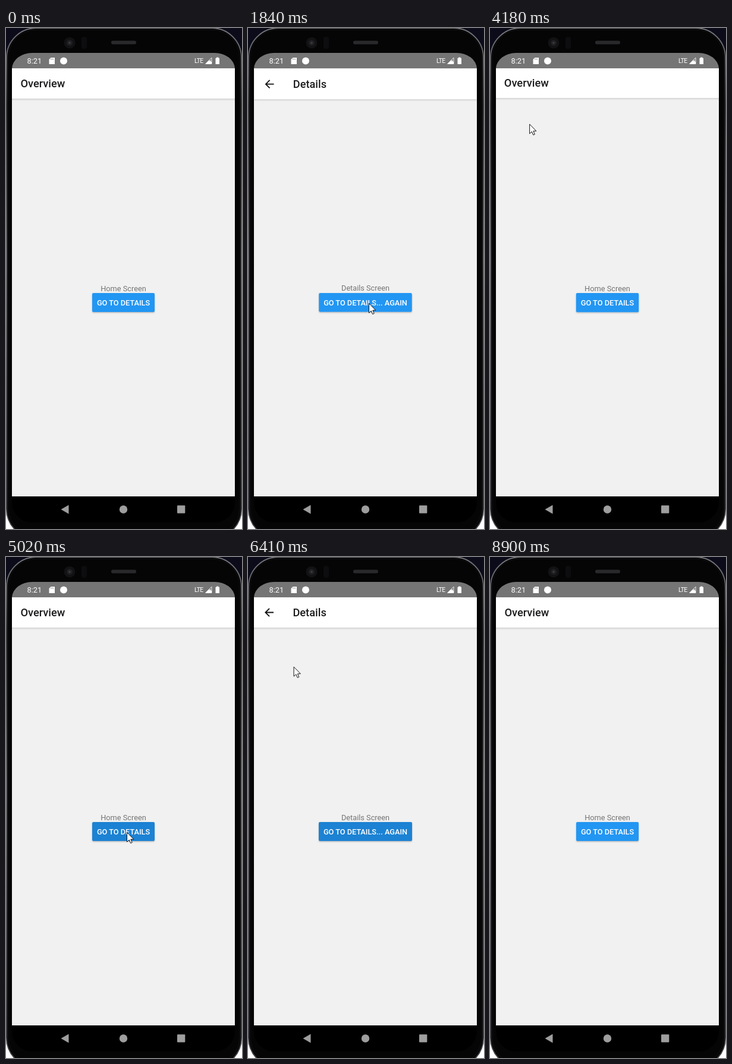
Recreate the animation shown at these times as an HTML page. Size 397 by 845 pixels, loop 9170 ms.

```html
<!DOCTYPE html>
<html lang="en">
<head>
<meta charset="utf-8">
<title>Stack navigation</title>
<style>
  html, body { margin: 0; width: 100%; height: 100%; overflow: hidden; background: #000; }
  svg { display: block; width: 100%; height: 100%; }
  text { font-family: Roboto, sans-serif; font-size: 12.76px; }
  .title { font-size: 18.25px; font-weight: 500; fill: #1c1c1e; }
  .label { fill: #757575; text-anchor: middle; }
  .caption { fill: #fff; font-weight: 500; text-anchor: middle; }
  .network { font-size: 10.5px; letter-spacing: -.6px; }
</style>
</head>
<body>
<svg viewBox="0 0 397 845">
  <defs>
    <linearGradient id="rim" x1="0" y1="0" x2="0" y2="1">
      <stop offset="0" stop-color="#77787b"/>
      <stop offset=".15" stop-color="#38393b"/>
      <stop offset=".45" stop-color="#66676a"/>
      <stop offset="1" stop-color="#3c3d40"/>
    </linearGradient>
    <linearGradient id="shade" x1="0" y1="0" x2="0" y2="1">
      <stop offset="0" stop-opacity=".13"/>
      <stop offset="1" stop-opacity="0"/>
    </linearGradient>
    <filter id="lift" x="-10%" y="-20%" width="120%" height="160%">
      <feDropShadow dx="0" dy="1.2" stdDeviation="1.2" flood-opacity=".28"/>
    </filter>
    <clipPath id="window"><rect x="10" y="68" width="375" height="722"/></clipPath>
  </defs>

  <!-- Phone body -->
  <rect width="397" height="420" fill="#0b0b1a"/>
  <rect y="420" width="397" height="425" fill="#fff"/>
  <rect x="1" y="0" width="395" height="861" rx="50" fill="#050506" stroke="url(#rim)" stroke-width="2"/>
  <rect x="4" y="3" width="389" height="853" rx="46" fill="#050506" stroke="#121214"/>
  <circle cx="107" cy="25" r="9.5" fill="#121214"/>
  <circle cx="107" cy="25" r="5" fill="#1f1f22"/>
  <circle cx="107" cy="25" r="2" fill="#38383d"/>
  <rect x="127" y="15" width="9" height="20" rx="3" fill="#0d0d0f"/>
  <rect x="177" y="21.5" width="42" height="6" rx="3" fill="#29292b"/>
  <path d="M10 789H385V800A34 34 0 0 1 351 834H44A34 34 0 0 1 10 800Z" fill="#000"/>

  <!-- Status bar -->
  <path d="M10 68A34 27 0 0 1 44 42H351A34 27 0 0 1 385 68Z" fill="#757575"/>
  <g fill="#fff">
    <text x="35.5" y="60">8:21</text>
    <path d="M75.5 50H82V61H72.5V53Z"/>
    <path d="M75.5 51.5v2m2-2v2m2-2v2" stroke="#757575" stroke-width=".8"/>
    <circle cx="97" cy="55.5" r="6"/>
    <text class="network" x="317" y="59.3">LTE</text>
    <path d="M341 55V61H335ZM341 55V61H346V57Z"/>
    <path d="M335.5 60.5L346 50V60.5M342 54l3 3m0-3l-3 3" fill="none" stroke="#fff" stroke-width=".8"/>
    <path d="M354 49.5h3.5v1.2H359V61H352.5V50.7H354Z"/>
  </g>

  <!-- Navigation bar -->
  <g fill="#9e9e9e">
    <path d="M92.500 812L105.500 804.500V819.500Z"/>
    <circle cx="197.5" cy="812" r="6.7"/>
    <rect x="288" y="805.3" width="13.3" height="13.3" rx="1"/>
  </g>

  <g clip-path="url(#window)">
    <rect x="10" y="68" width="375" height="722" fill="#f1f1f1"/>
    <g id="home"></g>
    <g id="details"></g>
  </g>
  <path id="cursor" d="M.5 .5V16.5L4.2 13L6.7 18.7L9.2 17.6L6.8 12.1H11.8Z"
        fill="#fff" stroke="#111" stroke-linejoin="round"/>
</svg>
<script>
const LOOP = 9170, TRANSITION = 400, CENTER_X = 197.5, CENTER_Y = 429;
const BUTTON = [203, 464], BACK = [35, 93];

const TAPS = [
  { at: 1585, on: "home", opens: true },
  { at: 3350, on: "details" },
  { at: 3965, on: "back" },
  { at: 5040, on: "home", opens: true },
  { at: 6300, on: "details" },
  { at: 6860, on: "back" }
];

// Where the pointer rests, and from when until when
const RESTS = [
  { from: 120, to: 120, spot: [344, 838] },
  { from: 400, to: 600, spot: [247, 698] },
  { from: 960, to: 1160, spot: [197, 504] },
  { from: 1400, to: 2650, spot: BUTTON },
  { from: 2900, to: 3200, spot: [197, 476] },
  { from: 3700, to: 3950, spot: BACK },
  { from: 4790, to: 6080, spot: BUTTON },
  { from: 6570, to: 6870, spot: BACK },
  { from: 7450, to: 7520, spot: [250, 415] },
  { from: 8100, to: 8350, spot: [322, 800] },
  { from: 8890, to: 8890, spot: [358, 845] }
];

const byId = id => document.getElementById(id);
const clamp = v => Math.min(1, Math.max(0, v));
const lerp = (a, b, k) => a + (b - a) * k;
const smooth = k => k * k * (3 - 2 * k);

function screen({ title, titleX, label, caption, width, arrow = "" }) {
  return `
    <rect x="10" y="68" width="375" height="722" fill="#f1f1f1"/>
    <rect x="10" y="119" width="375" height="4" fill="url(#shade)"/>
    <rect x="10" y="68" width="375" height="51" fill="#fff"/>
    ${arrow}
    <text class="title" x="${titleX}" y="100">${title}</text>
    <text class="label" x="${CENTER_X}" y="443.5">${label}</text>
    <rect class="button" x="${CENTER_X - width / 2}" y="447" width="${width}" height="32" rx="2" filter="url(#lift)"/>
    <text class="caption" x="${CENTER_X}" y="468">${caption}</text>`;
}

byId("home").innerHTML = screen({
  title: "Overview", titleX: 24.4, label: "Home Screen", caption: "GO TO DETAILS", width: 105
});
byId("details").innerHTML = screen({
  title: "Details", titleX: 75.4, label: "Details Screen", caption: "GO TO DETAILS... AGAIN", width: 157,
  arrow: `<path d="M43 93.5H29.500M36 86.800L29.300 93.500L36 100.200" fill="none" stroke="#111" stroke-width="1.8"/>`
});

// Cubic bezier (0.208, 0.82, 0.25, 1), solved by bisection
function ease(x) {
  if (x <= 0 || x >= 1) return clamp(x);
  const curve = (s, a, b) => 3 * (1 - s) ** 2 * s * a + 3 * (1 - s) * s * s * b + s ** 3;
  let low = 0, high = 1;
  for (let i = 0; i < 20; i++) {
    const mid = (low + high) / 2;
    if (curve(mid, .208, .25) < x) low = mid; else high = mid;
  }
  return curve(low, .82, 1);
}

function place(id, scale, opacity) {
  const node = byId(id);
  node.setAttribute("transform",
    `translate(${CENTER_X} ${CENTER_Y}) scale(${scale}) translate(${-CENTER_X} ${-CENTER_Y})`);
  node.setAttribute("opacity", opacity);
}

function navigate(t) {
  const last = TAPS.filter(tap => tap.on !== "details" && tap.at <= t).pop();
  const k = last ? ease((t - last.at) / TRANSITION) : 1;
  const p = last?.opens ? k : 1 - k;
  place("home", 1 + .075 * p, clamp((.2075 - p) / .125));
  place("details", 1 - (last?.opens ? .15 : .075) * (1 - p), clamp((p - .75) / .125));
}

function paintButton(id, t) {
  const pulses = TAPS.filter(tap => tap.on === id).map(tap => clamp((230 - Math.abs(t - tap.at)) / 80));
  const k = Math.max(...pulses);
  byId(id).querySelector(".button")
    .setAttribute("fill", `rgb(${lerp(33, 29, k)},${lerp(150, 130, k)},${lerp(243, 211, k)})`);
}

function movePointer(t) {
  const cursor = byId("cursor");
  const next = RESTS.findIndex(rest => rest.from > t);
  cursor.style.display = next < 1 ? "none" : "";
  if (next < 1) return;
  const a = RESTS[next - 1], b = RESTS[next];
  const k = smooth(clamp((t - a.to) / (b.from - a.to)));
  const [x, y] = a.spot.map((v, i) => lerp(v, b.spot[i], k));
  cursor.setAttribute("transform", `translate(${x} ${y})`);
}

const start = performance.now();
function draw(now) {
  const t = Math.max(0, now - start) % LOOP;
  navigate(t);
  paintButton("home", t);
  paintButton("details", t);
  movePointer(t);
  requestAnimationFrame(draw);
}
draw(start);
</script>
</body>
</html>
```
